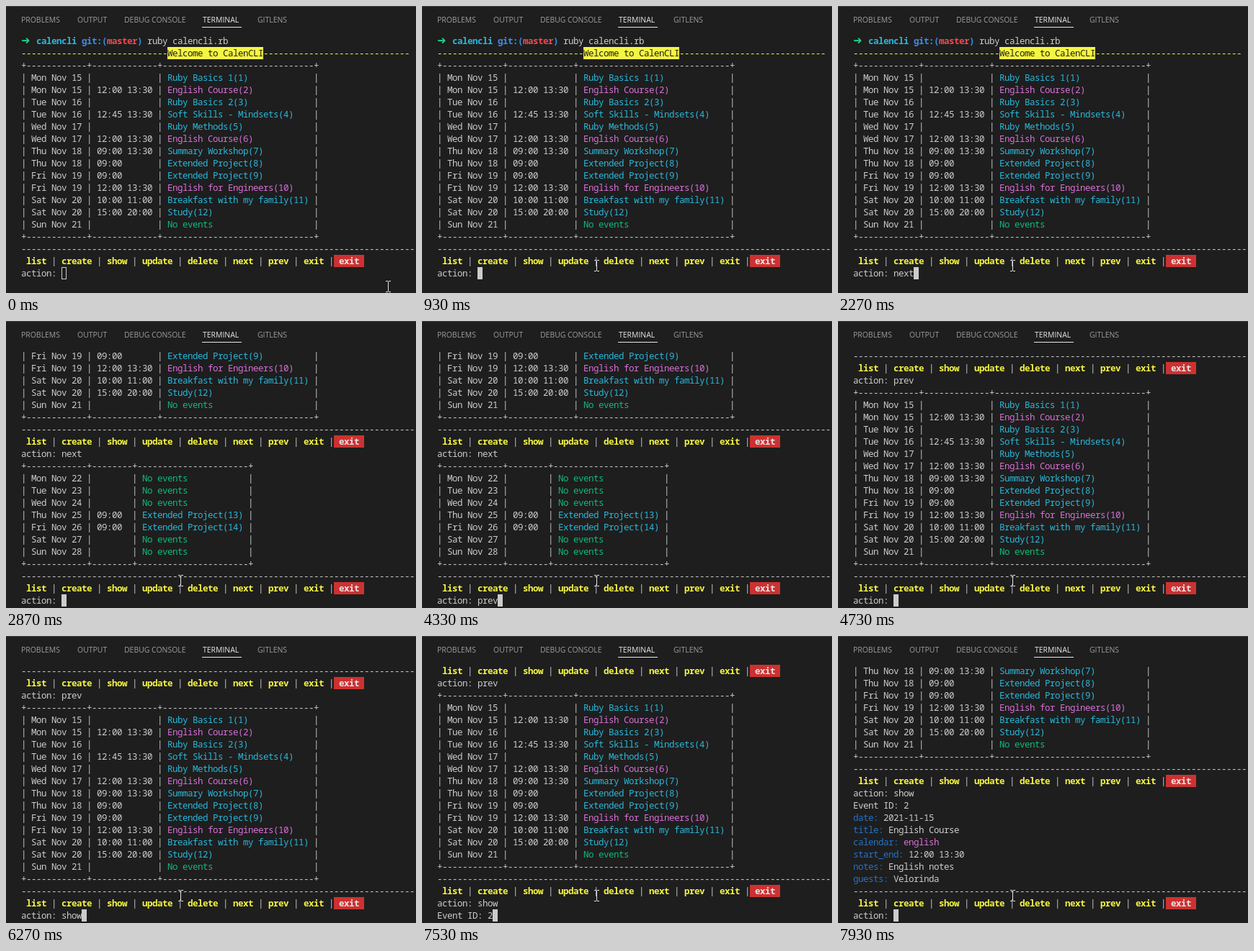
An HTML page with a canvas that plays this animation: 569 by 399 pixels, repeating every 8000 ms.

```html
<!DOCTYPE html>
<html lang="en">
<head>
<meta charset="utf-8">
<title>Calendar in a terminal</title>
<style>
  html, body { margin: 0; width: 100%; height: 100%; overflow: hidden; background: #1e1e1e; }
  canvas { display: block; }
</style>
</head>
<body>
<canvas id="stage" width="569" height="399"></canvas>
<script>
const ctx = document.getElementById('stage').getContext('2d');
const LOOP = 8000;
const LEFT = 21, TOP = 40, CELL = 7, ROW = 17, ROWS = 21, BASE = 13;
const MONO = '12.5px "Noto Sans Mono", "DejaVu Sans Mono", monospace';

const C = {
  bg: '#1e1e1e', fg: '#cccccc', cyan: '#29b8db', pink: '#d670d6', green: '#0dbc79', mint: '#23d18b',
  blue: '#2472c8', sky: '#3b8eea', yellow: '#f5f543', red: '#cd3131', rose: '#f14c4c',
  white: '#e5e5e5', tab: '#9d9d9d', tabOn: '#e7e7e7', edge: '#404040'
};

// A line is a list of runs: text, colour, bold, background.
const run = (text, color = C.fg, bold = false, bg = null) => ({ text, color, bold, bg });
const plain = text => [run(text)];

function table(timeWidth, titleWidth, events) {
  const border = plain('+' + [10, timeWidth, titleWidth].map(n => '-'.repeat(n + 2)).join('+') + '+');
  const rows = events.map(([day, time, title, color]) => [
    run(`| ${day} | ${time.padEnd(timeWidth)} | `),
    run(title.padEnd(titleWidth), color),
    run(' |')
  ]);
  return [border, ...rows, border];
}

function menu() {
  const line = [];
  for (const word of 'list create show update delete next prev exit'.split(' ')) {
    line.push(run(` ${word} `, C.yellow, true), run('|'));
  }
  line.push(run(' exit ', C.white, true, C.red));
  return [plain('-'.repeat(78)), line];
}

const field = (key, value, color) => [run(key + ': ', C.blue), run(value, color)];

const none = 'No events';
const thisWeek = table(11, 28, [
  ['Mon Nov 15', '', 'Ruby Basics 1(1)', C.cyan],
  ['Mon Nov 15', '12:00 13:30', 'English Course(2)', C.pink],
  ['Tue Nov 16', '', 'Ruby Basics 2(3)', C.cyan],
  ['Tue Nov 16', '12:45 13:30', 'Soft Skills - Mindsets(4)', C.cyan],
  ['Wed Nov 17', '', 'Ruby Methods(5)', C.cyan],
  ['Wed Nov 17', '12:00 13:30', 'English Course(6)', C.pink],
  ['Thu Nov 18', '09:00 13:30', 'Summary Workshop(7)', C.cyan],
  ['Thu Nov 18', '09:00', 'Extended Project(8)', C.cyan],
  ['Fri Nov 19', '09:00', 'Extended Project(9)', C.cyan],
  ['Fri Nov 19', '12:00 13:30', 'English for Engineers(10)', C.pink],
  ['Sat Nov 20', '10:00 11:00', 'Breakfast with my family(11)', C.cyan],
  ['Sat Nov 20', '15:00 20:00', 'Study(12)', C.cyan],
  ['Sun Nov 21', '', none, C.green]
]);
const nextWeek = table(6, 20, [
  ['Mon Nov 22', '', none, C.green],
  ['Tue Nov 23', '', none, C.green],
  ['Wed Nov 24', '', none, C.green],
  ['Thu Nov 25', '09:00', 'Extended Project(13)', C.cyan],
  ['Fri Nov 26', '09:00', 'Extended Project(14)', C.cyan],
  ['Sat Nov 27', '', none, C.green],
  ['Sun Nov 28', '', none, C.green]
]);
const details = [
  field('date', '2021-11-15'),
  field('title', 'English Course'),
  field('calendar', 'english', C.pink),
  field('start_end', '12:00 13:30'),
  field('notes', 'English notes'),
  field('guests', 'Velorinda')
];
const shell = [
  run('➜', C.mint, true), run('  '), run('calencli', C.cyan, true), run(' '),
  run('git:(', C.sky, true), run('master', C.rose, true), run(')', C.sky, true),
  run(' ruby calencli.rb')
];
const dashes = run('-'.repeat(29), C.yellow);
const welcome = [dashes, run('Welcome to CalenCLI', C.bg, false, C.yellow), dashes];

// Each screen adds output, then a prompt whose answer is typed at the given times.
const ask = 'action: ';
const screens = [
  { at: 0, out: [shell, welcome, ...thisWeek, ...menu()], ask, word: 'next', keys: [1730, 1870, 2000, 2270] },
  { at: 2870, out: [...nextWeek, ...menu()], ask, word: 'prev', keys: [3730, 3870, 4000, 4330] },
  { at: 4670, out: [], ask: '', word: '', keys: [], passing: true },
  { at: 4730, out: [...thisWeek, ...menu()], ask, word: 'show', keys: [5930, 6070, 6130, 6270] },
  { at: 6670, out: [], ask: 'Event ID: ', word: '2', keys: [7530] },
  { at: 7930, out: [...details, ...menu()], ask, word: '', keys: [] }
];

function terminalAt(t) {
  const lines = [];
  const shown = screens.filter(s => s.at <= t);
  shown.forEach((s, i) => {
    const last = i === shown.length - 1;
    if (s.passing && !last) return;
    const typed = s.keys.filter(k => k <= t).length;
    lines.push(...s.out, plain(s.ask + s.word.slice(0, typed)));
  });
  return lines.slice(-ROWS);
}

function drawLine(line, y) {
  let x = LEFT;
  for (const { text, color, bold, bg } of line) {
    if (bg) {
      ctx.fillStyle = bg;
      ctx.fillRect(x, y, text.length * CELL, ROW);
    }
    ctx.fillStyle = color;
    for (const ch of text) {
      ctx.font = ch === '➜' ? 'bold 15px "DejaVu Sans", sans-serif' : (bold ? 'bold ' : '500 ') + MONO;
      if (ch !== ' ') ctx.fillText(ch, x, y + BASE);
      x += CELL;
    }
  }
  return x;
}

function drawTabs() {
  ctx.fillStyle = C.edge;
  ctx.fillRect(0, 0, 569, 1);
  ctx.font = '500 10.45px "Open Sans", "Noto Sans", sans-serif';
  const tabs = [['PROBLEMS', 21], ['OUTPUT', 99], ['DEBUG CONSOLE', 164], ['TERMINAL', 273], ['GITLENS', 349]];
  for (const [label, x] of tabs) {
    ctx.fillStyle = label === 'TERMINAL' ? C.tabOn : C.tab;
    ctx.fillText(label, x, 23);
  }
  ctx.fillStyle = C.tabOn;
  ctx.fillRect(272, 29, 55, 1);
}

function drawCaret(x, y, focused) {
  if (focused) {
    ctx.fillStyle = C.fg;
    ctx.fillRect(x, y, CELL, ROW);
  } else {
    ctx.strokeStyle = C.fg;
    ctx.lineWidth = 1;
    ctx.strokeRect(x + 0.5, y + 0.5, CELL - 1, ROW - 1);
  }
}

const moves = [70, 130, 200, 270, 330, 400];

function drawPointer(t) {
  const p = moves.filter(m => m <= t).length / moves.length;
  const e = p * p * (3 - 2 * p);
  const x = Math.round(527 + (239 - 527) * e);
  const y = t >= 930 ? 353 : Math.round(382 + (354 - 382) * e);
  ctx.fillStyle = C.white;
  for (const end of [y, y + 15]) {
    ctx.fillRect(x, end, 3, 1);
    ctx.fillRect(x + 4, end, 3, 1);
  }
  ctx.fillRect(x + 3, y + 1, 1, 14);
}

function draw(t) {
  ctx.fillStyle = C.bg;
  ctx.fillRect(0, 0, 569, 399);
  drawTabs();
  const lines = terminalAt(t);
  let end = LEFT;
  lines.forEach((line, i) => { end = drawLine(line, TOP + i * ROW); });
  drawCaret(end, TOP + (lines.length - 1) * ROW, t >= 530);
  drawPointer(t);
}

const start = performance.now();
function tick() {
  draw((performance.now() - start) % LOOP);
  requestAnimationFrame(tick);
}
tick();
</script>
</body>
</html>
```
